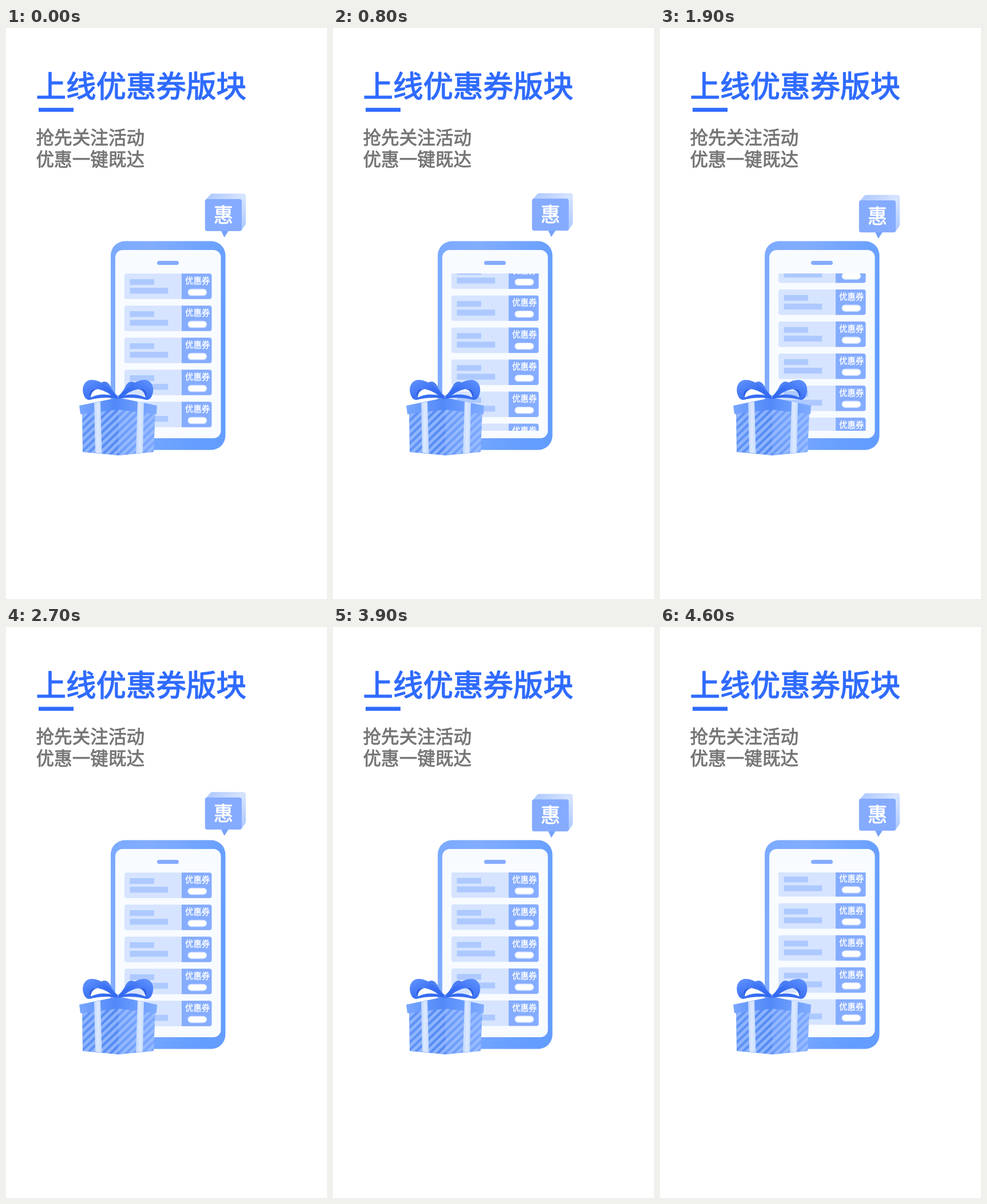
Recreate the animation shown at these times as an HTML page. Size 561 by 998 pixels, loop 4.7 s.

```html
<!DOCTYPE html>
<html lang="zh-CN">
<head>
<meta charset="utf-8">
<style>
html, body { margin: 0; width: 100%; height: 100%; overflow: hidden; background: #fff; }
svg { display: block; width: 561px; height: 998px; }
/* A thin outline gives the regular face a medium weight. */
text {
  font-family: "Noto Sans CJK SC", "Noto Sans CJK", sans-serif;
  font-weight: 400; stroke-width: .028em; stroke-linejoin: round;
}
.blue { fill: #2f6bff; stroke: #2f6bff; }
.grey { fill: #757575; stroke: #757575; }
.white { fill: #fff; stroke: #fff; }
</style>
</head>
<body>
<svg viewBox="0 0 561 998">
  <defs>
    <linearGradient id="phone" x1="0" y1="0" x2="1" y2=".4">
      <stop offset="0" stop-color="#7aaaff"/><stop offset=".3" stop-color="#82adff"/>
      <stop offset="1" stop-color="#639dff"/>
    </linearGradient>
    <linearGradient id="back" x1="0" y1="0" x2="1" y2="1">
      <stop offset="0" stop-color="#a9c6ff"/><stop offset=".5" stop-color="#d6e4ff"/>
      <stop offset="1" stop-color="#a9c6ff"/>
    </linearGradient>
    <linearGradient id="bow" x1="0" y1="0" x2="1" y2="1">
      <stop offset="0" stop-color="#6496ff"/><stop offset=".55" stop-color="#3a70f3"/>
      <stop offset="1" stop-color="#2f65ee"/>
    </linearGradient>
    <linearGradient id="lid">
      <stop offset="0" stop-color="#79a7ff"/><stop offset=".47" stop-color="#5288f8"/>
      <stop offset=".55" stop-color="#5b90fb"/><stop offset="1" stop-color="#80acff"/>
    </linearGradient>
    <linearGradient id="body">
      <stop offset="0" stop-color="#5f93f8"/><stop offset=".49" stop-color="#5288f4"/>
      <stop offset=".5" stop-color="#699afb"/><stop offset="1" stop-color="#7ba8ff"/>
    </linearGradient>
    <linearGradient id="ribbon">
      <stop offset="0" stop-color="#c1d7ff"/><stop offset=".5" stop-color="#dce9ff"/>
      <stop offset="1" stop-color="#c6daff"/>
    </linearGradient>
    <pattern id="stripes" width="9.500" height="9.500" patternUnits="userSpaceOnUse" patternTransform="rotate(-44)">
      <rect width="9.500" height="5.200" fill="#a0c1ff" fill-opacity=".75"/>
    </pattern>
    <clipPath id="view"><rect x="200" y="429" width="168" height="275"/></clipPath>
    <g id="card">
      <path d="M307 0H211a4 4 0 0 0-4 4V40.500a4 4 0 0 0 4 4H307z" fill="#d6e4ff"/>
      <path d="M307 0H355.500a4 4 0 0 1 4 4V40.500a4 4 0 0 1-4 4H307z" fill="#85acff"/>
      <path d="M216.500 9.700h42.500v10h-42.500zM216.500 24.800h66.800v10.200h-66.800z" fill="#adc9ff"/>
      <text class="white" x="313" y="18" font-size="14.400">优惠券</text>
      <rect x="318" y="27.200" width="32.600" height="11" rx="5.500" fill="#fff" stroke="#cfdfff" stroke-width="1.400"/>
    </g>
    <g id="half">
      <path d="M165 621C171 616 178 617 183 627C187 635 192 641 197 644L190 647C180 641 171 631 165 621Z" fill="#4c80f2"/>
      <path fill="url(#bow)" fill-rule="evenodd" d="M197 648C187 634 168 614 148 615C135 617 131 631 137 644C139 648 142 650 146 650C160 646 178 645 197 648Z
        M145 640C146 632 153 629 160 631C170 633 179 638 187 643C174 639 160 640 150 645C147 646 145 644 145 640Z"/>
      <path d="M145 640C146 632 153 629 160 631C152 633 149 638 148 645C146 645 145 643 145 640Z" fill="#2f62e8"/>
    </g>
  </defs>

  <text class="blue" x="52.500" y="121" font-size="52.500">上线优惠券版块</text>
  <rect x="57" y="139.500" width="61" height="7" fill="#2f6bff"/>
  <g font-size="31.600">
    <text class="grey" x="52.500" y="203">抢先关注活动</text>
    <text class="grey" x="52.500" y="241">优惠一键既达</text>
  </g>

  <rect x="183" y="372.500" width="200.500" height="365" rx="25" fill="url(#phone)"/>
  <rect x="191" y="388" width="184.500" height="329" rx="13" fill="#f8fbff"/>
  <rect x="264" y="407" width="38" height="7" rx="3.500" fill="#85abff"/>
  <g clip-path="url(#view)"><g id="list"></g></g>

  <g id="bubble">
    <path d="M348 302L357 291.500Q358 290 360 290H415Q419 290 419 294V341Q419 343 418 345L411 355Z" fill="url(#back)"/>
    <path d="M376 355L381.500 366.500L389 355Z" fill="#76a2fb"/>
    <rect x="347.800" y="299.500" width="64.200" height="56" rx="4" fill="#85abff"/>
    <text class="white" x="363" y="339.500" font-size="34">惠</text>
  </g>

  <path d="M133 667L197 661L261 667L258 741L197 747L134 741Z" fill="url(#body)"/>
  <path d="M133 667L197 661L261 667L258 741L197 747L134 741Z" fill="url(#stripes)"/>
  <path d="M128 660L196 646L264 660L263 675L196 667L130 675Z" fill="url(#lid)"/>
  <path d="M154 655L165 653L167.500 743.500L156 742.500Z" fill="url(#ribbon)"/>
  <path d="M230 653L241 655L239 742.500L227 743.500Z" fill="url(#ribbon)"/>
  <use href="#half"/>
  <use href="#half" transform="matrix(-1 0 0 1 391.500 0)"/>
</svg>
<script>
const LOOP = 4700, STEP = 100, CYCLE = 2400;
const list = document.getElementById('list');
const bubble = document.getElementById('bubble');

list.innerHTML = Array.from({ length: 9 }, (_, i) =>
  `<use href="#card" y="${429.3 + 56 * i}"/>`).join('');

const ease = u => u < .5 ? 4 * u ** 3 : 1 - 4 * (1 - u) ** 3;
const ramp = (t, start) => ease(Math.min(1, Math.max(0, (t - start) / 876)));
const shift = (el, y) => el.setAttribute('transform', `translate(0 ${y.toFixed(2)})`);

function draw(now) {
  const t = Math.floor(now % LOOP / STEP) * STEP;
  const p = t % CYCLE;
  // The list scrolls up, rests, then returns once per cycle.
  shift(list, -168.6 * (ramp(p, 262) - ramp(p, 1462)));
  shift(bubble, .1 - 1.9 * Math.sin(2 * Math.PI * (t + 100) / CYCLE));
}

const begin = performance.now();
function tick() {
  draw(performance.now() - begin);
  requestAnimationFrame(tick);
}
tick();
</script>
</body>
</html>
```
